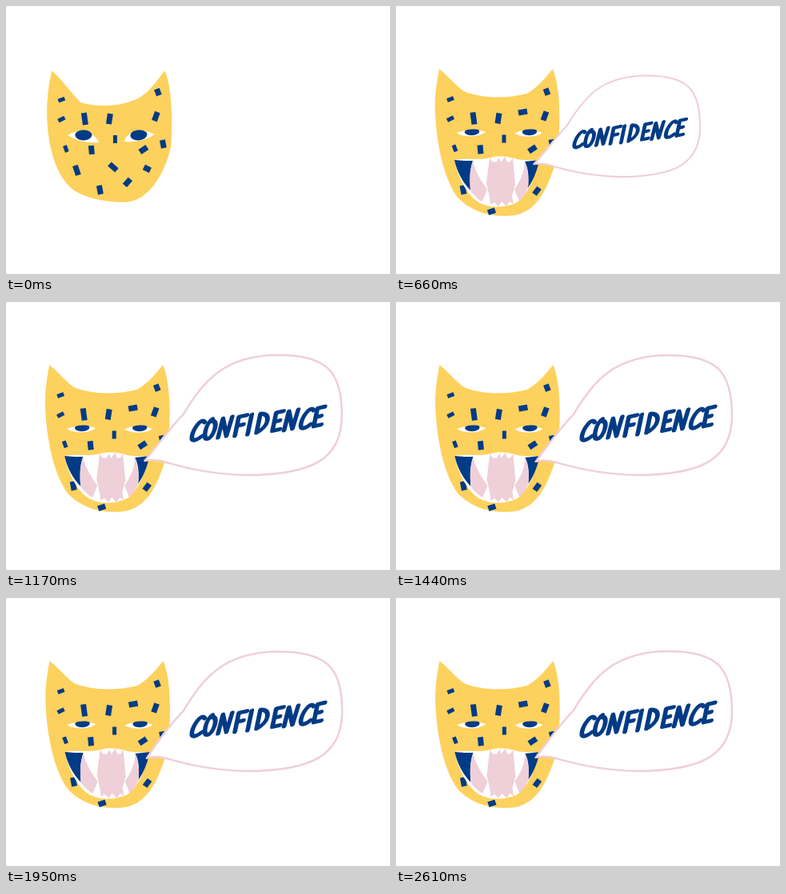
Animation of 480 by 336 pixels, one loop 2700 ms. Source, as an HTML page:

```html
<!DOCTYPE html>
<html lang="en">
<head>
<meta charset="utf-8">
<title>Confidence</title>
<style>
html, body { margin: 0; width: 100%; height: 100%; overflow: hidden; background: #fff; }
svg { display: block; width: 100%; height: 100%; }
.gold { fill: #fdd15d; }
.blue { fill: #003b85; }
.pink { fill: #efcfd8; }
.white { fill: #fff; }
.spots { fill: none; stroke: #003b85; stroke-width: 7; }
.slim { stroke-width: 5; }
#balloon { fill: #fff; stroke: #efcfd8; stroke-width: 2.5; stroke-linejoin: round; }
#word { fill: none; stroke: #003b85; stroke-width: 5; stroke-linecap: round; stroke-linejoin: round; }
</style>
</head>
<body>
<svg viewBox="0 0 480 336" role="img" aria-label="A leopard says CONFIDENCE">
  <g id="head">
    <path id="face" class="gold"/>
    <g id="brow">
      <path class="spots slim" d="M65 119L73 116M65 144L73 140M136 162L136 172M73 175L76 183"/>
      <path class="spots" d="M97 134L99 149M130 135L128 148M188 104L191 112M189 133L185 144M106 175L107 186M167 183L176 177M195 168L197 178M129 198L138 206M148 225L155 217"/>
    </g>
    <path id="cheeks" class="spots"/>
    <path id="eyeL" class="white"/>
    <path id="eyeR" class="white"/>
    <path id="irisL" class="blue"/>
    <path id="irisR" class="blue"/>
    <g id="mouth">
      <path class="white" d="M73 193C90 190 106 194 118 190C130 187 142 189 151 192C160 194 170 193 179 193C173 217 164 238 150 247C134 254 115 253 103 246C87 235 77 213 73 193Z"/>
      <path class="blue" d="M73 193C81 194 90 194 96 194C92 206 92 216 93 231C83 221 76 207 73 193Z"/>
      <path class="blue" d="M179 193C173 194 168 194 161 195C166 205 166 215 165 228C172 218 177 205 179 193Z"/>
      <path class="pink" d="M96 195C92 206 92 216 93 231C97 237 103 243 108 245L114 230C107 220 100 210 96 195Z"/>
      <path class="pink" d="M161 195C166 210 166 219 165 228C162 235 158 241 154 245L148 230C155 220 160 210 161 195Z"/>
      <path class="pink" d="M117 190L120 195L125 196L129 190L131 196L136 189L139 196L143 195L146 190L149 224L145 238L147 248L142 245L138 251L132 245L128 251L123 246L118 249L117 240L113 222Z"/>
    </g>
  </g>
  <g id="speech">
    <path id="balloon"/>
    <g id="word" transform="translate(229 174) rotate(-6.3)"></g>
  </g>
</svg>
<script>
const LOOP = 2700, STEP = 30;
const $ = id => document.getElementById(id);
const lerp = (a, b, k) => a + (b - a) * k;
const span = (t, from, length) => Math.min(1, Math.max(0, (t - from) / length));
const easeOut = u => 1 - (1 - u) ** 2;

// Each part: mouth shut, mouth open
const shapes = {
  face: [
    "M57 81C52 100 50 125 51 143C53 185 65 215 83 230C98 241 125 246 147 246C180 246 200 205 206 175C208 145 207 100 198 81C185 98 178 108 166 115C143 127 115 127 93 121C80 108 72 95 57 81Z",
    "M54 79C50 100 48 115 49 135C51 175 60 217 77 240C93 257 115 263 133 263C172 266 187 236 200 195C206 160 207 105 196 79C184 93 175 104 163 110C140 116 110 116 87 108C76 102 66 88 54 79Z"],
  cheeks: [
    "M86 200L90 212M172 202L180 206M116 225L118 236M158 133L158 133",
    "M83 225L85 236M173 236L179 228M115 259L124 256M153 134L164 132"],
  eyeL: [
    "M77 162C85 155 107 154 116 171C100 172 88 169 77 162Z",
    "M76 159C85 155 103 154 112 158C104 165 84 165 76 159Z"],
  eyeR: [
    "M185 161C174 154 152 154 147 170C162 171 176 168 185 161Z",
    "M183 159C174 155 156 154 148 160C158 165 176 165 183 159Z"],
  irisL: [
    "M86 162C86 154 106 153 107 162C105 171 87 170 86 162Z",
    "M86 157C88 154 102 154 104 156C106 164 84 164 86 157Z"],
  irisR: [
    "M155 163C155 153 176 154 176 161C175 170 157 171 155 163Z",
    "M158 157C160 154 174 154 176 156C178 164 156 164 158 157Z"]
};

// Brush letters: advance and strokes, baseline at zero
const glyphs = {
  C: [16, "M13 -21C8 -28 2 -14 2 -6C2 3 9 0 13 -4"],
  O: [18, "M7 -24C1 -20 0 0 6 0C13 0 15 -24 6 -21"],
  N: [20, "M2 0L3 -23L11 -1L13 -24"],
  F: [16, "M3 0L3 -23L12 -24M3 -12L10 -13"],
  I: [11, "M3 0L3 -24"],
  D: [20, "M3 -1L3 -24C16 -23 15 -6 3 -1"],
  E: [16, "M11 -24L3 -23L3 -1L11 -2M3 -12L9 -13"]
};

function letter(text) {
  let x = 0;
  $("word").innerHTML = [...text].map(c => {
    const [advance, d] = glyphs[c];
    const path = `<path transform="translate(${x}) skewX(-18) scale(1.15 1)" d="${d}"/>`;
    x += advance;
    return path;
  }).join("");
}

function morph([from, to], k) {
  const ends = to.match(/[\d.]+/g);
  let i = 0;
  return from.replace(/[\d.]+/g, n => lerp(+n, +ends[i++], k).toFixed(2));
}

function move(id, transform, shown = true) {
  $(id).setAttribute("transform", transform);
  $(id).style.display = shown ? "" : "none";
}

// The tail tip wanders; the round part follows a little
function balloon(sway) {
  const x = 172 + 4 * sway, y = 198 + 3 * sway, s = 1.2 * sway;
  const top = 66 + s, right = 419.6 + s / 2;
  return `M${x} ${y}C184 ${187 + s} 200 ${163 + s} 222 ${140 + s}` +
    `C246 ${100 + s} 272 ${top} 340 ${top}C400 ${top} ${right} 86 ${right} 142` +
    `C${right} 195 386 217 300 217C252 216 218 206 200 201C190 ${197 + s} 182 ${197 + s} ${x} ${y}Z`;
}

function draw(now) {
  const t = Math.floor(now % LOOP / STEP) * STEP;
  const open = span(t, 510, 150);
  const grown = easeOut(span(t, 570, 150));
  const sway = Math.sin(Math.PI * span(t, 930, 2200));
  const lift = .8 * span(t, 150, 270);

  for (const id in shapes) $(id).setAttribute("d", morph(shapes[id], open));
  $("balloon").setAttribute("d", balloon(sway));
  move("head", `translate(${lerp(.4, .6 * sway, open)} ${-lift * (1 - open)})`);
  move("brow", `translate(${-open} ${-.6 * open})`);
  move("mouth", `translate(0 ${191 * (1 - open)}) scale(1 ${open})`, open > 0);
  move("speech", `translate(${173 * (1 - grown)} ${199 * (1 - grown)}) scale(${grown})`, grown > 0);
}

letter("CONFIDENCE");
const begin = performance.now();
function tick() {
  draw(performance.now() - begin);
  requestAnimationFrame(tick);
}
tick();
</script>
</body>
</html>
```
